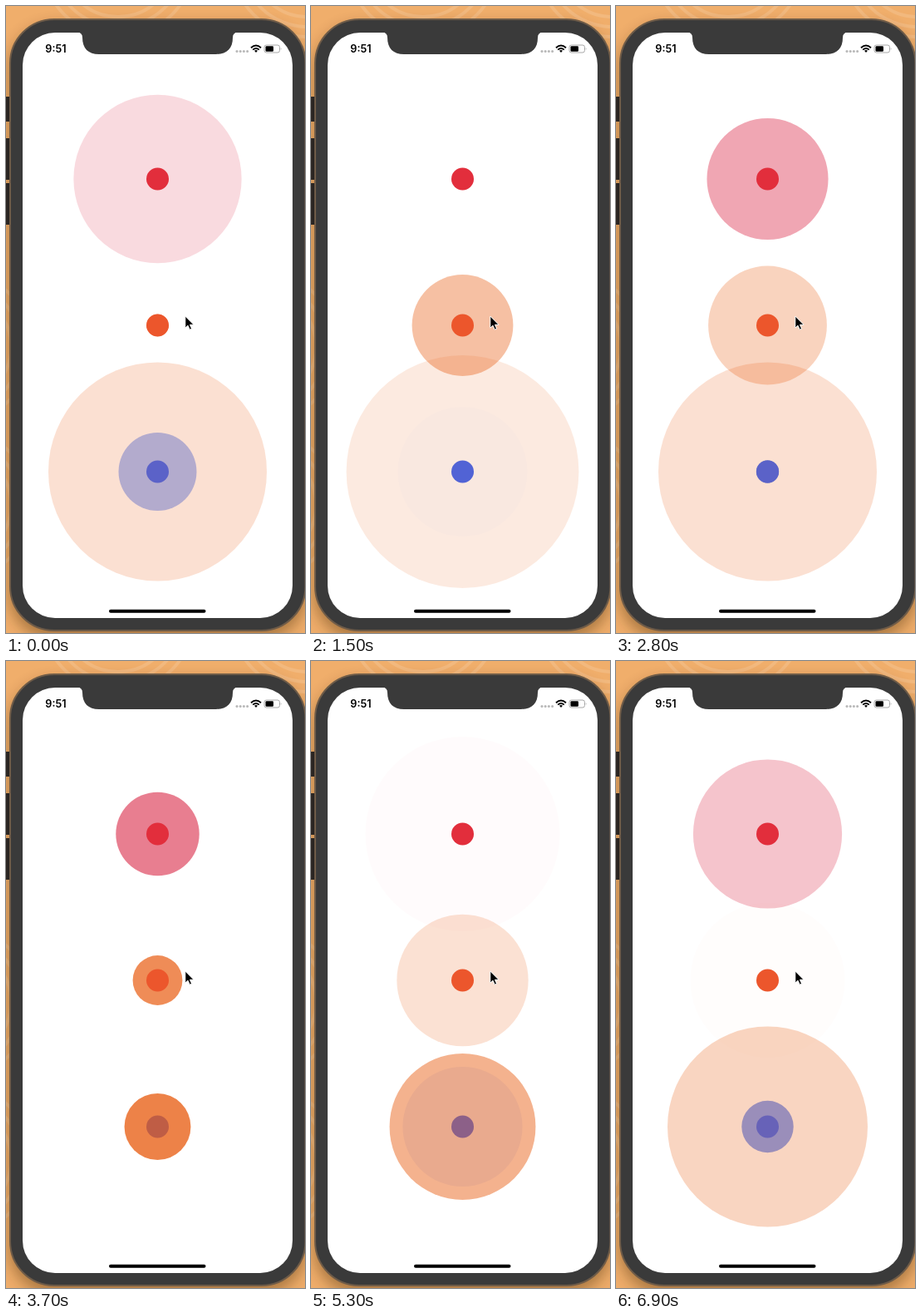
Animation, 360 px wide and 754 px high, one loop 7 s. Source, as an HTML page:

```html
<!DOCTYPE html>
<html lang="en">
<head>
<meta charset="utf-8">
<title>Pulsing dots</title>
<style>
  html, body { margin: 0; width: 100%; height: 100%; overflow: hidden; background: #f0ae6b; }
  svg { display: block; width: 360px; height: 754px; }
  text { font: 600 12.7px Inter, "Liberation Sans", sans-serif; }
</style>
</head>
<body>
<svg viewBox="0 0 360 754">
  <defs>
    <filter id="blur" x="-20%" y="-20%" width="140%" height="140%"><feGaussianBlur stdDeviation="9"/></filter>
    <g id="rings" fill="none" stroke="#fff" stroke-opacity=".13" stroke-width="4">
      <circle r="92"/><circle r="80"/><circle r="68"/>
    </g>
  </defs>

  <rect width="360" height="754" fill="#f0ae6b"/>
  <use href="#rings" x="135" y="-55"/>
  <use href="#rings" x="363" y="-55"/>
  <use href="#rings" x="-62" y="410"/>
  <use href="#rings" x="-62" y="600"/>

  <!-- phone -->
  <rect x="4" y="24" width="357" height="737" rx="54" fill="#3a2000" opacity=".4" filter="url(#blur)"/>
  <g fill="#2b2623">
    <rect x="-3" y="109" width="9" height="30" rx="2"/>
    <rect x="-3" y="159" width="9" height="50" rx="2"/>
    <rect x="-3" y="213" width="9" height="50" rx="2"/>
    <rect x="358.500" y="159" width="5" height="80"/>
  </g>
  <rect x="5" y="16" width="355.500" height="735" rx="53" fill="#3a3a3a" stroke="#6e5b48" stroke-width="2"/>
  <rect x="20" y="32" width="325" height="704" rx="39" fill="#fff"/>
  <path d="M86 31.500Q92 32 92 38C92 51 99 58 112 58H253C266 58 273 51 273 38Q273 32 279 31.500Z" fill="#3a3a3a"/>

  <!-- status bar -->
  <text x="47.300" y="56">9:51</text>
  <g fill="#b8b8b8">
    <circle cx="278" cy="54.500" r="1.500"/><circle cx="282.200" cy="54.500" r="1.500"/>
    <circle cx="286.400" cy="54.500" r="1.500"/><circle cx="290.600" cy="54.500" r="1.500"/>
  </g>
  <g fill="none" stroke="#000" stroke-width="1.900">
    <path d="M295 50.200Q301 44.600 307 50.200M297.200 52.600Q301 49.200 304.800 52.600"/>
    <path d="M299 53.800Q301 52.200 303 53.800L301 56Z" fill="#000" stroke="none"/>
  </g>
  <rect x="311" y="47" width="18.500" height="9" rx="2.500" fill="#fff" stroke="#a8a8a8"/>
  <rect x="312.500" y="48.300" width="9.500" height="6.400" rx="1.200"/>
  <path d="M330.800 49.800Q332.400 51.500 330.800 53.200Z" fill="#a8a8a8"/>

  <g id="stage"></g>

  <rect x="124" y="725.800" width="116.500" height="4" rx="2"/>
  <path d="M215.800 373V387.200L219 384.200L221.200 389.200L223.600 388.200L221.500 383.300H226Z" fill="#000" stroke="#fff" stroke-width="1" stroke-linejoin="round"/>
</svg>

<script>
const LOOP = 7000, STEP = 100, CX = 182.5;
const RED = { dot: '#e22e3c', halo: '#da2a48' };
const ORANGE = { dot: '#ec562c', halo: '#e85c10' };
const BLUE = { dot: '#3a64f2', halo: '#3468f0' };

// start: offset of one cycle in ms; dot: whether the pulse has a centre dot
const pulses = [
  { y: 208, color: RED, size: 118.5, period: 1000, start: 443, dot: true },
  { y: 384, color: ORANGE, size: 94, period: 1200, start: -152, dot: true },
  { y: 560, color: BLUE, size: 79, period: 1000, start: 656, dot: true },
  { y: 560, color: ORANGE, size: 156.8, period: 1400, start: 645 }
];

const stage = document.getElementById('stage');

function addCircle(y, color, r) {
  const c = document.createElementNS('http://www.w3.org/2000/svg', 'circle');
  c.setAttribute('cx', CX);
  c.setAttribute('cy', y);
  c.setAttribute('r', r);
  c.setAttribute('fill', color);
  return stage.appendChild(c);
}

for (const p of pulses) {
  p.halo = addCircle(p.y, p.color.halo, 0);
  if (p.dot) addCircle(p.y, p.color.dot, 13.5);
}

// cubic-bezier(.25, .1, .25, 1)
function ease(x) {
  let lo = 0, hi = 1;
  for (let i = 0; i < 24; i++) {
    const s = (lo + hi) / 2;
    if (0.75 * s * (1 - s) + s ** 3 < x) lo = s; else hi = s;
  }
  const s = lo, q = 1 - s;
  return 0.3 * s * q * q + 3 * q * s * s + s ** 3;
}

function draw(now) {
  const t = Math.floor((now % LOOP) / STEP) * STEP;
  for (const p of pulses) {
    const age = (t - p.start + 2 * p.period) % p.period;
    const e = ease(age / p.period);
    p.halo.setAttribute('r', (p.size * e).toFixed(2));
    p.halo.setAttribute('opacity', ((1 - e) ** 0.92).toFixed(3));
  }
}

const origin = performance.now();
function tick() {
  draw(performance.now() - origin);
  requestAnimationFrame(tick);
}
tick();
</script>
</body>
</html>
```
